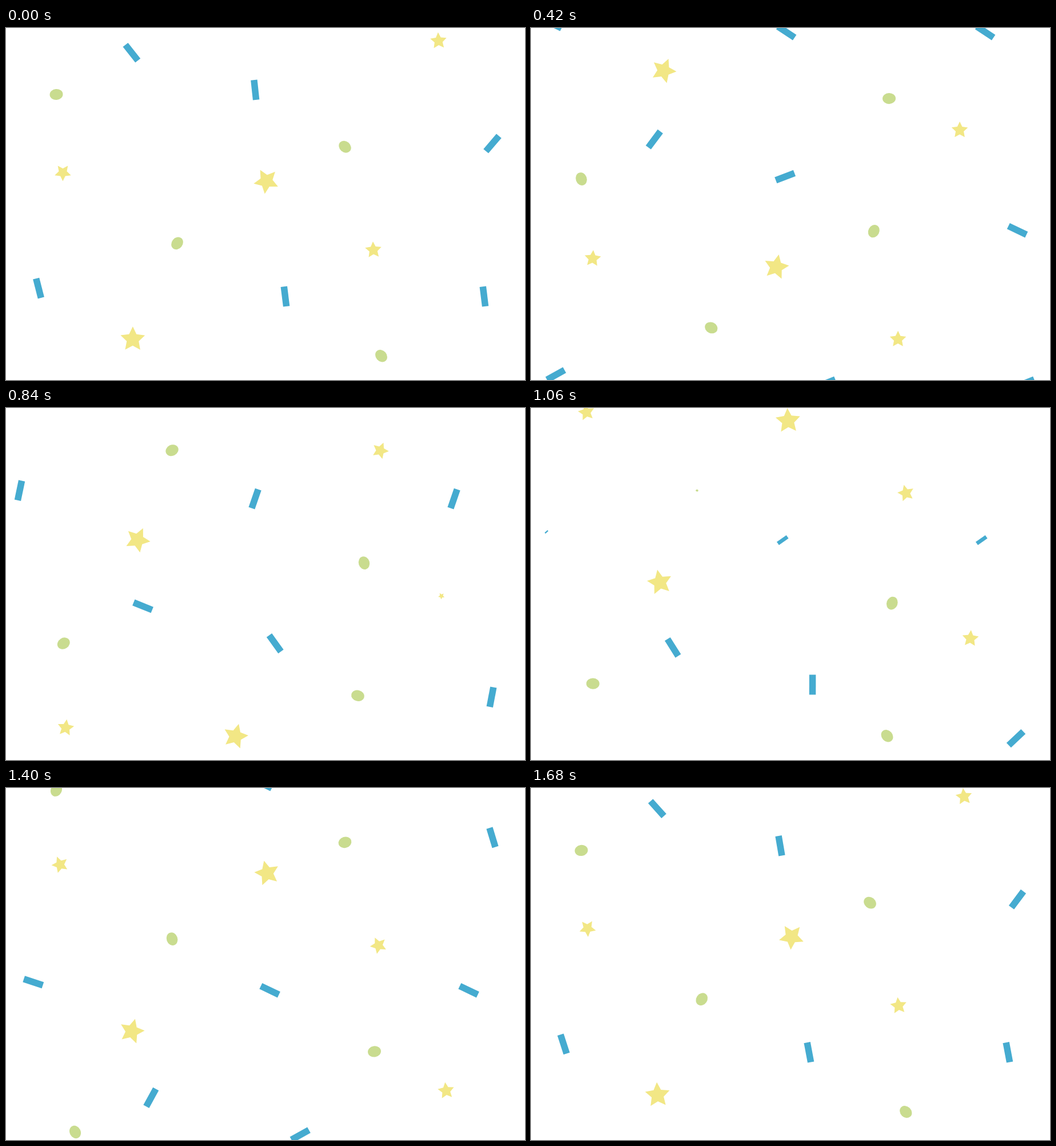
An HTML page with a canvas for the animation above (1.72 s loop, 908x617 px).

```html
<!DOCTYPE html>
<html lang="en">
<head>
<meta charset="utf-8">
<title>Confetti</title>
<style>
  html, body { margin: 0; width: 100%; height: 100%; overflow: hidden; background: #fff; }
  canvas { display: block; }
</style>
</head>
<body>
<canvas id="stage" width="908" height="617"></canvas>
<script>
const W = 908, H = 617, LOOP = 1720, CYCLE = 85, HALF_SWING = 44.5;
const ctx = document.getElementById('stage').getContext('2d');

// Age 0 is the moment a piece pops up at y. The same piece, one cycle older, falls in from the top.
// After the age "gust" a piece is also blown sideways.
const dots = { color: '#c9dc8f', speed: 7.05, y: 137.65, oldY: 137.65, angle: 5.7, oldAngle: 5.7, spin: 3.6, gust: 22, shape: dot };
const bars = { color: '#45abd0', speed: 7.24, y: 209.9, oldY: 209.8, angle: 134, oldAngle: 134, spin: 3.58, gust: 26.5, shape: bar };
const stars = { color: '#f2e785', speed: 7.45, y: 314.7, oldY: 320.6, angle: 33.3, oldAngle: 68.2, spin: 3.58, gust: 2, shape: star };

function dot(size) {
  ctx.ellipse(0, 0, 11.5 * size, 9.6 * size, 0, 0, Math.PI * 2);
}

function bar(size) {
  ctx.rect(-17.5 * size, -5.75 * size, 35 * size, 11.5 * size);
}

function star(size) {
  for (let i = 0; i < 10; i++) {
    const r = size * (i % 2 ? 0.49 : 1), a = i * Math.PI / 5;
    ctx.lineTo(r * Math.sin(a), -r * Math.cos(a));
  }
  ctx.closePath();
}

const ease = u => u * u * u * (10 + u * (6 * u - 15));

// 0 at age 0, 1 half a swing later, and back, eased at both turns.
function swing(age) {
  const u = Math.abs(age / HALF_SWING) % 2;
  return ease(u > 1 ? 2 - u : u);
}

const pieces = [];
const add = (kind, start, x, { sway = 0, turn = 0, drift = 0, size = 1 } = {}) =>
  pieces.push({ kind, start, x, sway, turn, drift, size });

for (const [start, x] of [[82, 88], [34, 290.5], [10, 593], [62, 626.5]])
  add(dots, start, x, { drift: 0.75 });

const sway = 33, turn = -9.7;
add(bars, 71, 435.5, { sway, turn, drift: 2.1 });
for (const x of [435.5, 783.5]) add(bars, 36, x, { sway, turn, drift: 2.1 });
add(bars, 62, 214.5, { sway, turn, drift: 0.5 });
add(bars, 34, 24, { sway, turn });
add(bars, 84, 851, { drift: -0.1 });

const SMALL = 15, BIG = 22.5;
add(stars, 76, 94.5, { sway: 13.5, turn: -28, size: SMALL });
add(stars, 45, 750, { sway: 20.5, turn: -22, size: SMALL });
add(stars, 10, 656, { sway: -15, turn: -23, size: SMALL });
add(stars, 31, 232.5, { sway: -12.5, turn: -26, size: BIG });
add(stars, 78, 457, { sway: -15, turn: -18, drift: -1.25, size: BIG });

function drawPiece(piece, age) {
  const { kind } = piece, old = age < 0;
  const x = piece.x + piece.sway * swing(age - piece.turn) + piece.drift * Math.max(0, age - kind.gust);
  const y = (old ? kind.oldY : kind.y) + kind.speed * age;
  const angle = (old ? kind.oldAngle : kind.angle) + kind.spin * age;
  const grow = old ? 1 : Math.min(1, 0.195 * age);
  if (y < -30 || y > H + 30 || grow === 0) return;
  ctx.save();
  ctx.translate(x, y);
  ctx.rotate(angle * Math.PI / 180);
  ctx.fillStyle = kind.color;
  ctx.beginPath();
  kind.shape(piece.size * grow);
  ctx.fill();
  ctx.restore();
}

// 20 ms ticks; every 420 ms one step is held twice and one is skipped.
function stepAt(ms) {
  return 21 * Math.floor(ms / 420) + Math.max(0, Math.floor((ms % 420) / 20) - 1);
}

function draw(step) {
  ctx.fillStyle = '#fff';
  ctx.fillRect(0, 0, W, H);
  for (const piece of pieces) {
    const age = (piece.start + step) % CYCLE;
    drawPiece(piece, age);
    drawPiece(piece, age - CYCLE);
  }
}

const begin = performance.now();
function tick() {
  draw(stepAt((performance.now() - begin) % LOOP));
  requestAnimationFrame(tick);
}
tick();
</script>
</body>
</html>
```
